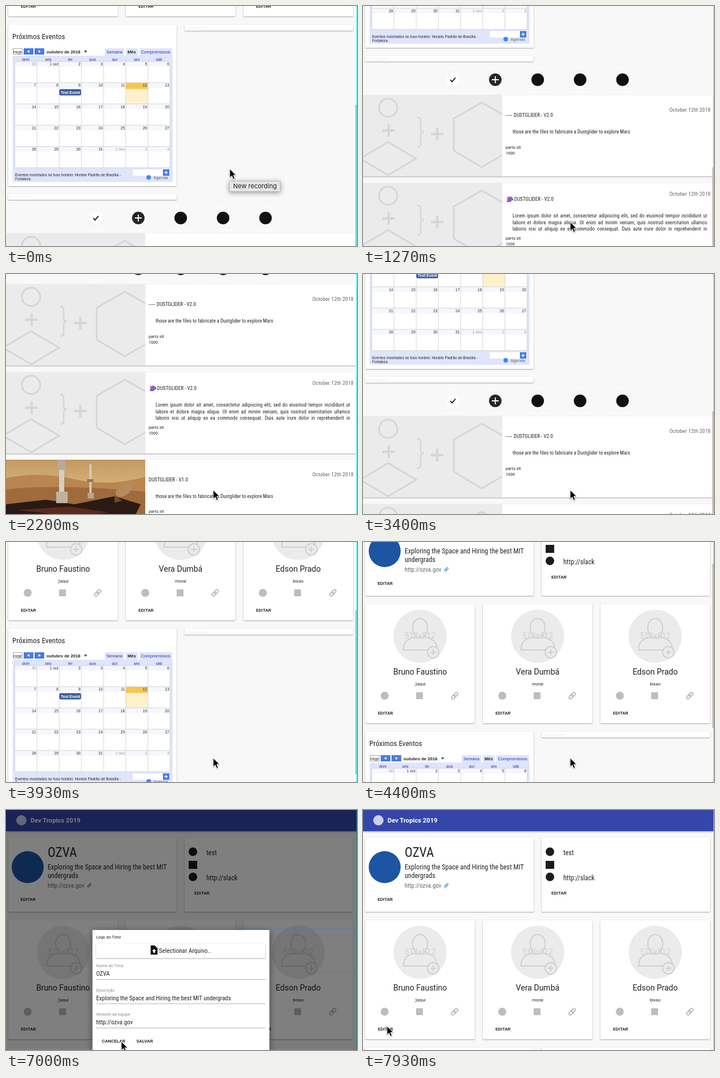
An HTML page that plays this animation: 615 px wide and 420 px high, repeating every 8000 ms.

```html
<!DOCTYPE html>
<html lang="pt-BR">
<head>
<meta charset="utf-8">
<title>Painel do time</title>
<style>
html, body { margin: 0; width: 100%; height: 100%; overflow: hidden; background: #f8f8f8; }
svg { display: block; width: 615px; height: 420px; }
text { font-family: Roboto, sans-serif; fill: #222; white-space: pre; }
.c { font-family: "Roboto Condensed", Roboto, sans-serif; font-stretch: 75%; letter-spacing: var(--track); }
.a { font-family: "Liberation Sans", Arial, sans-serif; }
.b { font-weight: 700; }
.btn { font-weight: 500; fill: #111; }
.m { text-anchor: middle; }
.e { text-anchor: end; }
.card { fill: #fff; filter: drop-shadow(0 1px 1.3px rgba(0,0,0,.32)); }
.lorem div { font-size: 8.8px; line-height: 11.5px; height: 11.5px; overflow: hidden; color: #222; text-align: justify; text-align-last: justify; }
</style>
</head>
<body>
<svg id="stage" viewBox="0 0 615 420"></svg>
<script>
const stage = document.getElementById('stage');
const TEAM = 'OZVA', SITE = 'http://ozva.gov', CRAFT = 'DUSTGLIDER';

const text = (x, y, s, size, cls = '', fill = '') =>
  `<text x="${x}" y="${y}" font-size="${size}" class="${cls}"${fill && ` style="fill:${fill}"`}>${s}</text>`;
const rect = (x, y, w, h, fill, more = '') =>
  `<rect x="${x}" y="${y}" width="${w}" height="${h}" fill="${fill}" ${more}/>`;
const circle = (x, y, r, fill, more = '') => `<circle cx="${x}" cy="${y}" r="${r}" fill="${fill}" ${more}/>`;
const line = (d, color, w = 1, more = '') =>
  `<path d="${d}" fill="none" stroke="${color}" stroke-width="${w}" ${more}/>`;
const shape = (d, fill) => `<path d="${d}" fill="${fill}"/>`;
const card = (x, y, w, h) => `<rect x="${x}" y="${y}" width="${w}" height="${h}" rx="1" class="card"/>`;
const at = (x, y, body, more = '') => `<g transform="translate(${x} ${y}) ${more}">${body}</g>`;
const times = (n, fn) => Array.from({ length: n }, (_, i) => fn(i)).join('');
const edit = (x, y) => text(x, y, 'EDITAR', 8, 'btn');

const chain = (x, y, k, color) => at(x, y, [-3.2, 3.2].map(dx =>
  rect(dx - 4, -2.6, 8, 5.2, 'none', `rx="2.6" stroke="${color}" stroke-width="2"`)).join(''),
  `rotate(-45) scale(${k})`);

function teamCards() {
  return card(4, 49, 295, 129) + circle(38, 100, 28, '#1c55a2') +
    text(73, 82, TEAM, 23, 'c') +
    text(73, 104, 'Exploring the Space and Hiring the best MIT', 12, 'c') +
    text(73, 119, 'undergrads', 12, 'c') +
    text(73, 136, SITE, 10.7, 'c', '#666') + chain(146, 132, .55, '#2aa0d8') + edit(25.5, 159) +
    card(313, 49, 295, 129) +
    circle(327.5, 73, 7.5, '#1b1b1b') + rect(320, 89, 15, 14, '#1b1b1b') + circle(327.5, 117, 7.5, '#1b1b1b') +
    text(351, 79, 'test', 12, 'c') + text(351, 123, 'http://slack', 12, 'c') + edit(330, 148);
}

function member(x, name, note) {
  const gray = '#d0d0d0', icon = '#bdbdbd';
  return at(x, 193, card(0, 0, 192, 208) + circle(96, 56, 46.5, '#ebebeb') +
    text(96, 60, '512x512', 14, 'm', gray) +
    line('M96 25c8 0 13 7 13 16s-5 18-13 18-13-9-13-18 5-16 13-16z', gray, 2) +
    line('M86 57C72 62 67 66 67 80H126C126 66 120 62 106 57', gray, 2) +
    circle(119, 84, 10, '#ebebeb', `stroke="${gray}" stroke-width="2"`) +
    line('M119 79v10M114 84h10', gray, 2) +
    text(96, 123, name, 14, 'm') + text(96, 142, note, 7.8, 'm') +
    circle(34, 160, 7, icon) + rect(89, 154, 12, 12, icon) + chain(156.5, 160, .95, icon) +
    edit(22, 193));
}

function calendar() {
  const cw = 38.86, rh = 37.2, blue = '#2a2fae', days = ['dom', 'seg', 'ter', 'qua', 'qui', 'sex', 'sáb'];
  const colX = i => 15.5 + cw * i, rowY = i => 97 + rh * i;
  const label = d => d < 1 ? '30' : d === 1 ? '1 out' : d === 32 ? '1 nov' : d > 31 ? d - 31 : d;
  return card(4, 33, 295, 282) + text(11, 58, 'Próximos Eventos', 13, 'c') +
    rect(12.5, 74.5, 16, 10, '#fff', 'stroke="#aaa"') + text(13, 82.5, 'Hoje', 7.2, 'a') +
    rect(31, 74, 17, 11, '#4a7ce2') + rect(50, 74, 17, 11, '#4a7ce2') +
    shape('M41 77v5l-4-2.500zM57 77v5l4-2.500z', '#fff') +
    text(71, 83, 'outubro de 2018', 7.7, 'a b') + shape('M136.500 78h6l-3 4z', '#555') +
    rect(173, 74, 34, 13, '#dfe5fb') + rect(210, 74, 21, 13, '#dfe5fb') + rect(234, 74, 57, 13, '#dfe5fb') +
    text(176, 83, 'Semana', 7.5, 'a', blue) + text(213, 83, 'Mês', 7.5, 'a b') +
    text(236.5, 83, 'Compromissos', 7.7, 'a', blue) +
    rect(11.5, 87, 280.5, 221, '#dfe5fb') +
    days.map((d, i) => text(colX(i + .5), 96, d, 6.8, 'a m', blue)).join('') +
    rect(15.5, 97, 272, 186, '#fff') +
    times(5, r => rect(15.5, rowY(r), 272, 9, '#f6f7fd')) +
    rect(colX(5), rowY(1), cw, rh, '#fdf1cc') + rect(colX(5), rowY(1), cw, 11, '#f6c653') +
    times(6, i => line(`M15.500 ${rowY(i)}H287.500`, '#ccc', .8)) +
    times(8, i => line(`M${colX(i)} 97V283`, '#ccc', .8)) +
    times(35, i => text(colX(i % 7 + 1) - 1.5, rowY(i / 7 | 0) + 7.2, label(i), 6.8, 'a e',
      i < 1 || i > 31 ? '#999' : '#333')) +
    rect(94, 146, 37, 10, '#40609f', 'rx="1.5" stroke="#22386e" stroke-width=".8"') +
    text(96, 153.5, 'Test Event', 6.8, 'a b', '#fff') +
    text(16, 298, 'Eventos mostrados no fuso horário: Horário Padrão de Brasília -', 6.5, 'a') +
    text(16, 305, 'Fortaleza', 6.5, 'a') +
    rect(222, 286, 54, 11, '#fff') + rect(275, 286, 11, 11, '#3f7be4') +
    line('M280.500 288.500v6M277.500 291.500h6', '#fff', 1.3) +
    circle(250, 300, 4, '#4285f4') + text(258.5, 303, 'Agenda', 7.4, 'a', '#666');
}

function levels() {
  return times(5, i => {
    const x = 157.5 + 74.3 * i;
    return text(x, 735, 'LEVEL ' + (i + 1), 6.5, 'm', '#fff') + text(x, 778, 'level points', 6.5, 'm', '#fff') +
      circle(x, 754, 11, i ? i > 1 ? '#111' : '#262626' : '#fff');
  }) + line('M153 754l3 3.500 6-7', '#111', 1.8) + line('M231.800 748v12M225.800 754h12', '#fff', 1.8);
}

const blueprint = rect(0, 0, 244, 142, '#ebebeb') +
  `<g clip-path="url(#pic)">` +
  line(`M60 22a16 16 0 1 1-32 0a16 16 0 1 1 32 0M-5 111L44 82 93 111 44 140z
    M208 13L258 41V97L208 126 159 97V41z`, '#d6d6d6', 3) +
  line('M34 62h22M45 51v22M119 68h22M130 57v22', '#d6d6d6', 4) +
  line('M95 39q6 0 6 6v13q0 7 6 7q-6 0-6 7v13q0 6-6 6', '#d6d6d6', 2.5) + `</g>`;

const desert = `<g clip-path="url(#pic)">` + rect(0, 0, 244, 142, 'url(#sky)') +
  shape('M0 32Q60 20 120 34T244 30V142H0z', '#b98550') +
  shape('M0 52Q90 42 244 56V142H0z', '#a06a3c') +
  shape('M0 78L70 70 120 78 190 64 236 78 225 100 244 142H0z', '#2a1a14') +
  shape('M20 88L110 82 180 92 120 100z', '#5b2a1c') +
  rect(90, 0, 14, 20, '#b9aa98') + rect(93, 18, 9, 44, '#d8cdbd') + rect(88, 56, 20, 20, '#c0b2a0') +
  rect(146, 8, 4, 54, '#d5c8b4') + rect(142, 34, 11, 5, '#8d7a66') + rect(143, 58, 11, 10, '#b5a48f') +
  `<ellipse cx="207" cy="52" rx="17" ry="10" fill="#b68a5c" transform="rotate(-38 207 52)"/>` +
  shape('M190 62l14 10-14 3z', '#6e4a30') + `</g>`;

function project(y, pic, titleX, title, lift, body, partsY) {
  return at(0, y, card(0, 0, 613, 142) + pic +
    text(609, 29 - lift, 'October 12th 2018', 9.8, 'c e', '#666') +
    text(titleX, 38 - lift, title, 9, 'c') + body +
    text(250, partsY, 'parts.stl', 8, 'c') + text(250, partsY + 10, '1000', 8, 'c'));
}

function projects() {
  const short = text(262, 67, 'those are the files to fabricate a Dustglider to explore Mars', 8.8, 'c');
  const lorem = ['Lorem ipsum dolor sit amet, consectetur adipiscing elit, sed do eiusmod tempor incididunt ut',
    'labore et dolore magna aliqua. Ut enim ad minim veniam, quis nostrud exercitation ullamco',
    'laboris nisi ut aliquip ex ea commodo consequat. Duis aute irure dolor in reprehenderit in'];
  const long = `<foreignObject x="262" y="52" width="341" height="36"><div xmlns="http://www.w3.org/1999/xhtml"
    class="lorem c">${lorem.map(s => `<div>${s}</div>`).join('')}</div></foreignObject>`;
  const unicorn = shape('M252 33l1-7 4-3 5 2 2 5-3 0-2 3z', '#8a64b8') + shape('M251 23l4 1-2 2z', '#d77fb0');
  return project(781, blueprint, 264, CRAFT + ' - V2.0', 0, text(250, 38, '-----', 9, 'c') + short, 94) +
    project(935, blueprint, 265, CRAFT + ' - V2.0', 7, unicorn + long, 99) +
    project(1088, desert, 250, CRAFT + ' - V1.0', 0, short, 93);
}

function modal() {
  const field = (y, label, value) => text(158, y, label, 7.3, '', '#8a8a8a') +
    text(158, y + 15, value, 10.7, 'c') + line(`M158 ${y + 21.5}H454.500`, '#9e9e9e', .8);
  return `<rect x="151.500" y="210" width="310" height="216" fill="#fff" style="filter:drop-shadow(0 3px 6px #0007)"/>` +
    text(158, 225, 'Logo do Time', 8, 'c') + card(158, 233.5, 296.5, 25.5) +
    shape('M253.500 237h7l5 5v11h-12z', '#111') + shape('M259.500 243l3.500 4h-2v3h-3v-3h-2z', '#fff') +
    text(268, 250, 'Selectionar Arquivo..', 11, 'c') +
    field(275, 'Nome do Time', TEAM) +
    field(317.5, 'Descrição', 'Exploring the Space and Hiring the best MIT undergrads') +
    field(360, 'Website da equipe', SITE) +
    text(168, 407, 'CANCELAR', 8, 'btn') + text(228.5, 407, 'SALVAR', 8, 'btn');
}

stage.innerHTML = `<defs>
  <clipPath id="pic"><rect width="244" height="142"/></clipPath>
  <linearGradient id="sky" x2="0" y2="1"><stop stop-color="#c39a60"/><stop offset=".4" stop-color="#d9b780"/></linearGradient>
  </defs>` + rect(0, 0, 615, 420, '#f8f8f8') +
  `<g id="page"><rect width="615" height="37" fill="#3546ab" style="filter:drop-shadow(0 1px 1.5px #0006)"/>` +
  circle(27, 18, 9, '#c9cfee') + text(43, 22, 'Dev Tropics 2019', 11.2, 'b', '#fff') +
  teamCards() + member(4, 'Bruno Faustino', ';)aqui') + member(210, 'Vera Dumbá', 'moral') +
  member(416, 'Edson Prado', 'bixao') + at(0, 383, calendar()) +
  card(313, 416, 295, 10) + text(315, 424, 'next event', 8, '', '#eee') +
  card(4, 712, 295, 10) + text(6, 720, 'next event', 8, '', '#eee') +
  levels() + projects() + `</g>` +
  rect(612, 0, 2, 287, '#bcbcbc', 'id="thumb"') + rect(614, 0, 1, 420, '#35f5f7') +
  `<g id="shade">` + rect(0, 0, 615, 420, '#000', 'opacity=".5"') +
  line('M148 206H210M404 207.500H614M462 283H614', '#4a7fb0', 1, 'opacity=".6"') + `</g>` +
  `<g id="modal">${modal()}</g>` +
  `<g id="tip"><rect x="391.500" y="306.500" width="89" height="18" fill="#e6e6e6" stroke="#bdbdbd" style="filter:drop-shadow(0 2px 4px #0006)"/>` +
  `<text x="398" y="319" font-size="11" style="font-family:Inter,sans-serif">New recording</text></g>` +
  `<path id="cursor" d="M0 0V15.500l3.600-3.400 2.500 5.900 2.700-1.100-2.500-5.800H11z" stroke="#fff" style="filter:drop-shadow(0 1px 1px #0005)"/>`;

// Tracking that gives the condensed face the same run length whichever font is present.
const probe = 'Exploring the Space and Hiring the best MIT';
stage.insertAdjacentHTML('beforeend', text(0, 0, probe, 100, 'c'));
const run = stage.lastElementChild.getComputedTextLength();
stage.lastElementChild.remove();
stage.style.setProperty('--track', `${((17.4 - run / 100) / probe.length).toFixed(4)}em`);

const scrollKeys = [[60, 383], [200, 391], [830, 391], [1000, 450], [1270, 625], [1450, 695], [1670, 735],
  [1900, 756], [2140, 763], [2960, 763], [3150, 690], [3500, 470], [3930, 264], [4300, 110], [4670, 15], [4870, 0]];
const cursorKeys = [[830, 392, 285], [1000, 363, 378], [4560, 363, 378], [5070, 295, 207], [5230, 295, 207],
  [5530, 87, 170], [5730, 38, 150], [6300, 38, 150], [6700, 150, 350], [7000, 202, 405],
  [7480, 202, 405], [7700, 85, 384], [7930, 42, 378]];
const thumbKeys = [[440, 1], [600, 0], [830, 0], [870, 1], [2050, 1], [2200, 0], [2960, 0], [3000, 1], [4900, 1], [5070, 0]];
const tipKeys = [[440, 1], [600, 0]];
const modalKeys = [[5960, 0], [6350, 1], [7255, 1], [7330, 0]];

function track(keys, t) {
  const i = keys.findIndex(k => k[0] > t);
  if (i < 0) return keys.at(-1).slice(1);
  if (!i) return keys[0].slice(1);
  const a = keys[i - 1], b = keys[i], p = (t - a[0]) / (b[0] - a[0]);
  return a.slice(1).map((v, j) => v + (b[j + 1] - v) * p);
}

const el = id => document.getElementById(id);
const [page, thumb, shade, box, tip, cursor] = ['page', 'thumb', 'shade', 'modal', 'tip', 'cursor'].map(el);
const set = (node, name, value) => node.setAttribute(name, value);

function draw(now) {
  const t = now % 8000;
  const scroll = Math.round(track(scrollKeys, t)[0]);
  const [open] = track(modalKeys, t), eased = 1 - (1 - open) ** 2;
  set(page, 'transform', `translate(0 ${-scroll})`);
  set(thumb, 'y', scroll * .452);
  set(thumb, 'opacity', track(thumbKeys, t)[0]);
  set(tip, 'opacity', track(tipKeys, t)[0]);
  set(shade, 'opacity', open);
  set(box, 'opacity', open);
  set(box, 'transform', `translate(306 317) scale(${.7 + .3 * eased}) translate(-306 -317)`);
  set(cursor, 'transform', `translate(${track(cursorKeys, t)})`);
}

const start = performance.now();
function tick() {
  draw(performance.now() - start);
  requestAnimationFrame(tick);
}
tick();
</script>
</body>
</html>
```
